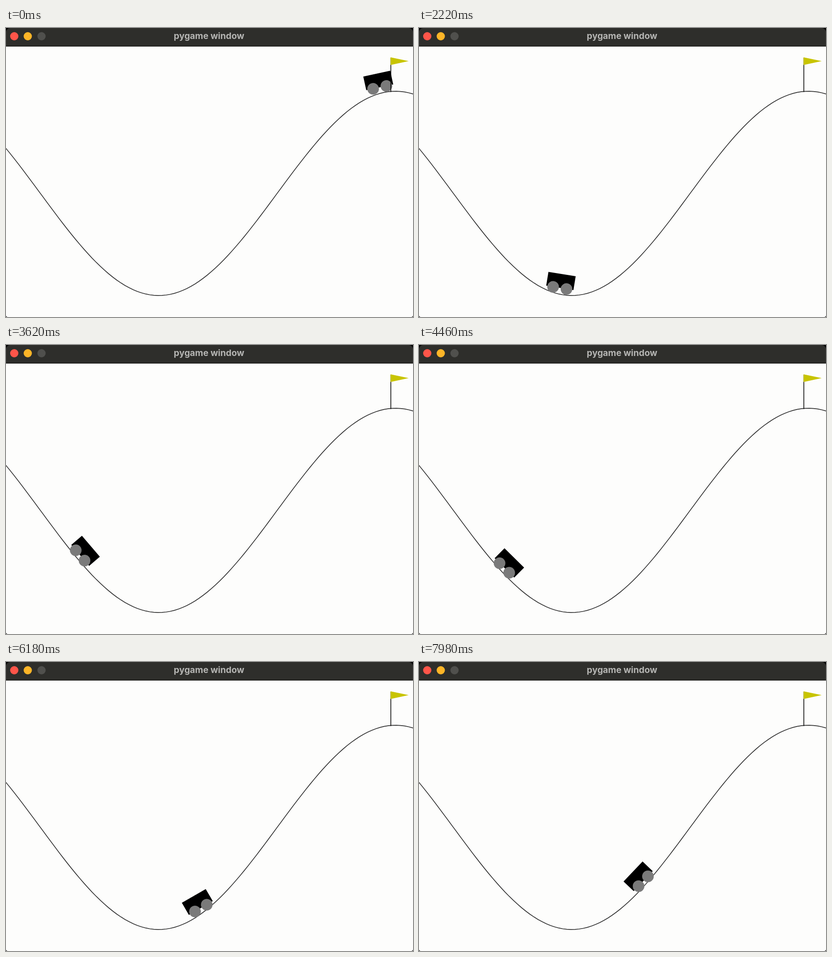
These frames come from a looping animation (888x631 px, 8 s). An HTML page with a canvas:

```html
<!DOCTYPE html>
<html>
<head>
<meta charset="utf-8">
<style>
  html, body { margin: 0; width: 100%; height: 100%; overflow: hidden; background: #000; }
  canvas { display: block; }
</style>
</head>
<body>
<canvas id="stage" width="888" height="631"></canvas>
<script>
const ctx = document.getElementById('stage').getContext('2d');
const LOOP = 8000;
const UNIT = 1.48;            // window pixels per simulation pixel
const WORLD = 888 / 1.8;      // window pixels per unit of track position

// Swing of the car: [step, x, speed in pixels per step]
const swing = [
  [1, 472, 0.8], [5, 474, 0], [26, 424, -4.6], [47, 307, -6.3], [77, 162, -2],
  [82, 157, 0], [109, 267.5, 7], [133, 424.5, 5.9], [159, 506, 0], [171, 488.5, -3.1]
];

const phase = x => 3 * (x / WORLD - 1.2);
const trackY = x => 361.1 - 223 * Math.sin(phase(x));

// Steps come in threes: two short ones and a long one.
function stepAt(ms) {
  const t = ms + 20, rest = t % 140;
  return 3 * Math.floor(t / 140) + (rest < 20 ? 0 : rest < 40 ? 1 : 2) - 1;
}

function carX(step) {
  if (step < 1) return 815;   // the previous run, just before the flag
  const i = Math.max(1, swing.findIndex(key => key[0] >= step));
  const [s0, x0, v0] = swing[i - 1], [s1, x1, v1] = swing[i];
  const d = s1 - s0, u = (step - s0) / d, w = 1 - u;
  return w * w * ((1 + 2 * u) * x0 + u * d * v0) + u * u * ((3 - 2 * u) * x1 - w * d * v1);
}

function disc(x, y, r, color) {
  ctx.fillStyle = color;
  ctx.beginPath();
  ctx.arc(x, y, r, 0, 2 * Math.PI);
  ctx.fill();
}

function drawWindow() {
  ctx.fillStyle = '#fdfdfc';
  ctx.fillRect(0, 39, 888, 592);
  ctx.fillStyle = '#2e2e2b';
  ctx.fillRect(0, 0, 888, 39);
  ctx.fillStyle = '#171715';
  ctx.fillRect(0, 38.7, 888, 1.8);
  disc(18, 18, 9, '#ff5549');
  disc(47.5, 18, 9, '#fdb527');
  disc(77.5, 18, 9, '#50504d');
  ctx.fillStyle = '#b5b5b3';
  ctx.font = '700 19.3px Inter, sans-serif';
  ctx.textAlign = 'center';
  ctx.fillText('pygame window', 443, 23.5);
}

function drawTrack() {
  ctx.strokeStyle = '#333';
  ctx.lineWidth = 1.7;
  ctx.beginPath();
  for (let i = 0; i <= 100; i++) {
    const x = i * 888 / 99;
    ctx.lineTo(x - 0.4, trackY(x));
  }
  ctx.stroke();
}

function drawCar(x) {
  ctx.save();
  ctx.translate(x + 0.3, trackY(x) - 14.2);
  ctx.rotate(-Math.cos(phase(x)));
  ctx.fillStyle = '#000';
  ctx.fillRect(-20 * UNIT - 0.5, -20 * UNIT - 0.5, 40 * UNIT + 1, 20 * UNIT + 1);
  for (const side of [-1, 1]) disc(side * 10 * UNIT, 0.7, 12.7, '#7a7a7a');
  ctx.restore();
}

function drawFlag() {
  ctx.fillStyle = '#000';
  ctx.fillRect(838.8, 65, 1.6, 74.5);
  ctx.fillStyle = '#c8c400';
  ctx.beginPath();
  ctx.moveTo(839, 64);
  ctx.lineTo(878.5, 72.3);
  ctx.lineTo(839, 80.8);
  ctx.fill();
}

function draw(now) {
  ctx.clearRect(0, 0, 888, 631);
  ctx.save();
  ctx.beginPath();
  ctx.roundRect(0, 0, 888, 631, [9, 9, 4, 4]);
  ctx.clip();
  drawWindow();
  drawTrack();
  drawCar(carX(stepAt(now % LOOP)));
  drawFlag();
  ctx.restore();
}

const start = performance.now();
function tick() {
  draw(performance.now() - start);
  requestAnimationFrame(tick);
}
tick();
</script>
</body>
</html>
```
